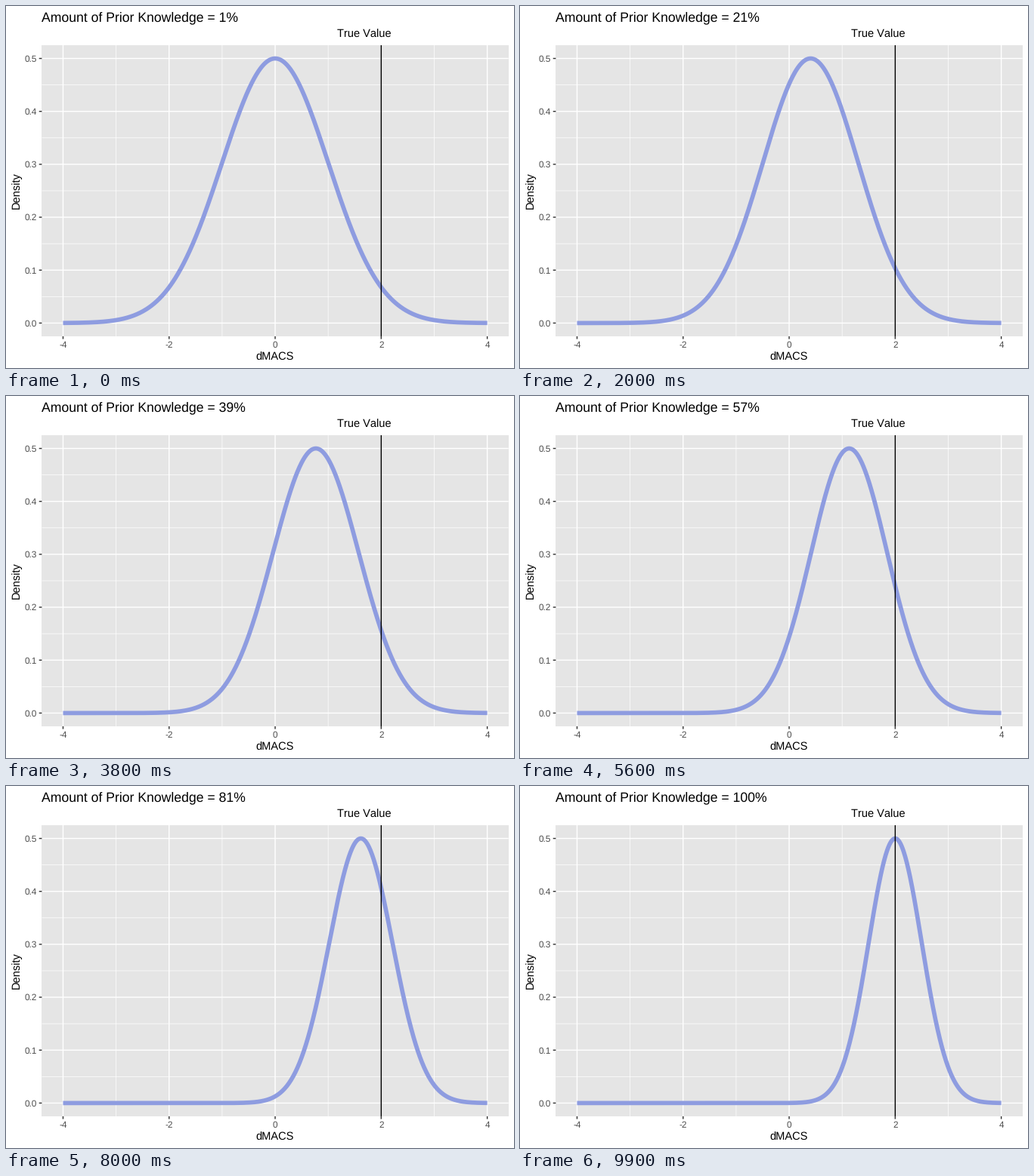
Write a matplotlib script that moves like this. It is 672 px wide and 480 px high and loops after 10000 ms.

```python
import numpy as np
import matplotlib.pyplot as plt
from matplotlib.animation import FuncAnimation
from matplotlib.patches import Rectangle

W, H, DPI = 672, 480, 96
FRAMES, INTERVAL = 100, 100
LEFT, RIGHT, TOP, BOTTOM = 47.4, 664.67, 52.0, 437.95
TICK = 3.67
THIN, NORMAL, THICK = 0.71, 1.42, 5.69

plt.rcParams.update({
    "font.family": "Liberation Sans",
    "text.hinting": "none",
    "text.kerning_factor": 6,
    "axes.unicode_minus": False,
})

fig = plt.figure(figsize=(W / DPI, H / DPI), dpi=DPI, facecolor="white")
ax = fig.add_axes([0, 0, 1, 1])
ax.set_xlim(0, W)
ax.set_ylim(H, 0)
ax.axis("off")


def px(x):
    return LEFT + (x + 4.4) / 8.8 * (RIGHT - LEFT)


def py(y):
    return BOTTOM - (y + 0.025) / 0.55 * (BOTTOM - TOP)


def line(xs, ys, color, width, z):
    return ax.plot(xs, ys, color=color, lw=width * 72 / DPI, zorder=z, snap=False,
                   solid_capstyle="butt", solid_joinstyle="round")[0]


def label(x, y, text, size, color="black", ha="center", **kw):
    return ax.text(x, y, text, fontsize=size, color=color, ha=ha,
                   va="baseline", **kw)


def vgrid(x, width):
    line([px(x)] * 2, [TOP, BOTTOM], "white", width, 1)


def hgrid(y, width):
    line([LEFT, RIGHT], [py(y)] * 2, "white", width, 1)


ax.add_patch(Rectangle((LEFT, TOP), RIGHT - LEFT, BOTTOM - TOP,
                       fc="#E5E5E5", ec="none", zorder=0))

for x in (-3, -1, 1, 3):
    vgrid(x, THIN)
for y in np.arange(0.05, 0.5, 0.1):
    hgrid(y, THIN)

for x in range(-4, 5, 2):
    vgrid(x, NORMAL)
    line([px(x)] * 2, [BOTTOM, BOTTOM + TICK], "#333333", NORMAL, 2)
    label(px(x), 453, f"{x}", 8.8, "#4D4D4D")
for y in np.arange(6) / 10:
    hgrid(y, NORMAL)
    line([LEFT - TICK, LEFT], [py(y)] * 2, "#333333", NORMAL, 2)
    label(LEFT - 6.6, py(y) + 4.2, f"{y:.1f}", 8.8, "#4D4D4D", ha="right")

label(px(0), 470, "dMACS", 11)
label(18, (TOP + BOTTOM) / 2, "Density", 11, rotation=90,
      rotation_mode="anchor")
label(474.1, 42, "True Value", 11)
title = label(LEFT, 20, "", 13.2, ha="left")

grid = np.linspace(-4, 4, 801)
curve = line(px(grid), py(0 * grid), "#8E9CE0", THICK, 3)
line([px(2)] * 2, [TOP, BOTTOM], "black", NORMAL, 4)


def update(i):
    t = i / (FRAMES - 1)
    mean, sd = 2 * t, 1 - 0.5 * t
    curve.set_ydata(py(0.5 * np.exp(-((grid - mean) / sd) ** 2 / 2)))
    title.set_text(f"Amount of Prior Knowledge = {i + 1}%")
    return curve, title


anim = FuncAnimation(fig, update, frames=FRAMES, interval=INTERVAL,
                     repeat=True, repeat_delay=0)
plt.show()
```
